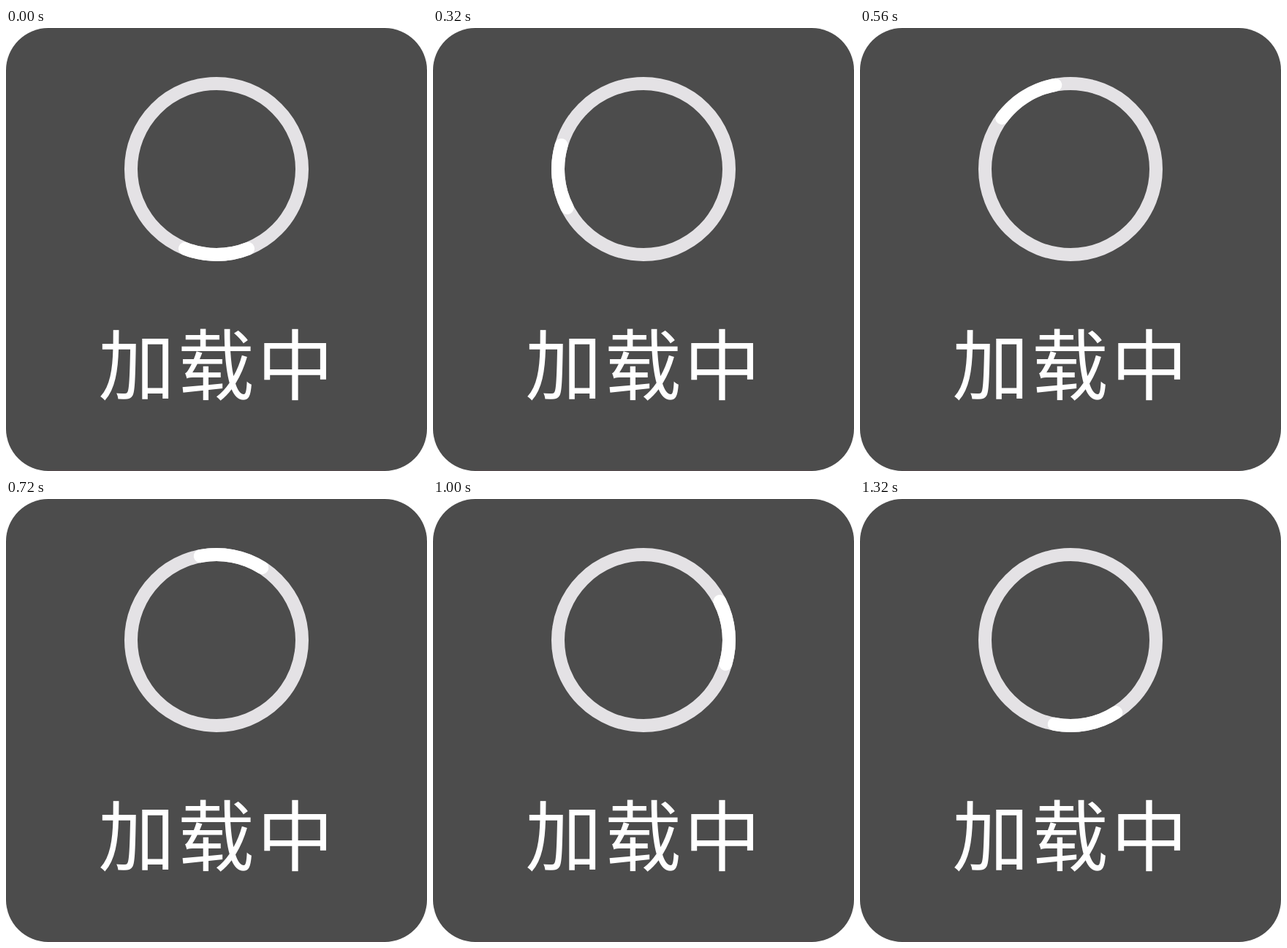
Animation, 576 px wide and 606 px high, one loop 1360 ms. Source, as an HTML page:

```html
<!DOCTYPE html>
<html lang="zh-CN">
<head>
<meta charset="utf-8">
<style>
  html, body { margin: 0; height: 100%; overflow: hidden; background: #fff; }
  svg { display: block; width: 576px; height: 606px; }
  .ring { fill: none; stroke-width: 18; stroke-linecap: round; }
  text {
    font: 300 105px "Noto Sans CJK SC", "Noto Sans CJK", sans-serif;
    letter-spacing: 3.5px; fill: #fff; text-anchor: middle;
  }
</style>
</head>
<body>
<svg viewBox="0 0 576 606">
  <rect width="576" height="606" rx="58" fill="#4c4c4c"/>
  <path d="M58 605H518" stroke="#524b4d" stroke-width="2"/>
  <circle class="ring" cx="288" cy="193" r="117" stroke="#e4e2e5"/>
  <path class="ring" id="arc" d="M331 301.8A117 117 0 0 1 245 301.8" stroke="#fff"/>
  <text x="289" y="500">加载中</text>
</svg>
<script>
  const LOOP = 1360, STEP = 40;
  const arc = document.getElementById('arc');

  function draw() {
    const time = Math.floor(performance.now() % LOOP / STEP) * STEP;
    arc.setAttribute('transform', `rotate(${time / LOOP * 360} 288 193)`);
    requestAnimationFrame(draw);
  }
  draw();
</script>
</body>
</html>
```
